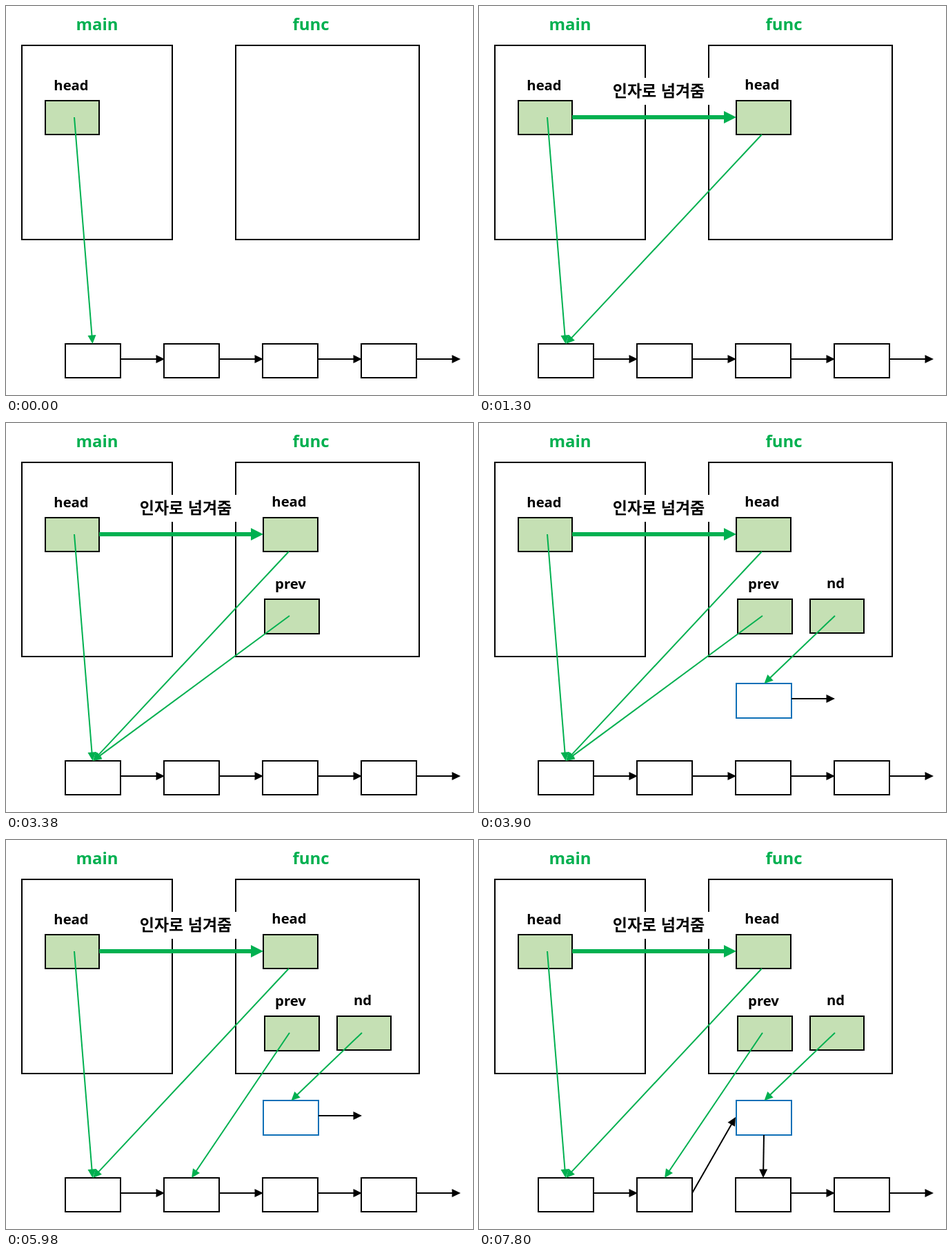
Recreate the animation shown at these times as an HTML page. Size 677 px wide and 563 px high, loop 8 s.

```html
<!DOCTYPE html>
<html lang="ko">
<head>
<meta charset="utf-8">
<style>
  html, body { margin: 0; width: 100%; height: 100%; overflow: hidden; background: #fff; }
  svg { display: block; width: 677px; height: 563px; }
  text { font: 700 20.3px "Open Sans", "Noto Sans", sans-serif; text-anchor: middle; }
  .title { font-size: 24px; fill: #00b050; }
  .ko { font: 700 23px "Noto Sans CJK KR", "Noto Sans CJK", sans-serif; }
</style>
</head>
<body>
<svg id="stage" viewBox="0 0 677 563"></svg>
<script>
const LOOP = 8000, STEP = 1300, LAST = 6;
const GREEN = '#00b050', PALE = '#c5e0b4', BLUE = '#0f70b7', BLACK = '#000';
const stage = document.getElementById('stage');
const parts = [];

// Each part is visible from step `from` through step `to`.
function add(tag, attrs, from = 0, to = LAST) {
  const el = document.createElementNS('http://www.w3.org/2000/svg', tag);
  for (const key in attrs) el.setAttribute(key, attrs[key]);
  stage.append(el);
  parts.push({ el, from, to });
  return el;
}

function box(x1, y1, x2, y2, from, fill = '#fff', stroke = BLACK) {
  add('rect', { x: x1, y: y1, width: x2 - x1, height: y2 - y1, fill, stroke, 'stroke-width': 2 }, from);
}

function label(x, y, str, from, cls = '') {
  add('text', { x, y, class: cls }, from).textContent = str;
}

function arrow(x1, y1, x2, y2, color, from, to, width = 2, head = 12.5) {
  const len = Math.hypot(x2 - x1, y2 - y1);
  const ux = (x2 - x1) / len, uy = (y2 - y1) / len;
  const bx = x2 - ux * head, by = y2 - uy * head;
  const half = width > 2 ? head / 2 : 6;
  add('line', { x1, y1, x2: bx + ux, y2: by + uy, stroke: color, 'stroke-width': width }, from, to);
  add('polygon', {
    points: [[x2, y2], [bx - uy * half, by + ux * half], [bx + uy * half, by - ux * half]].join(' '),
    fill: color
  }, from, to);
}

// Stack frames
box(23, 57, 241, 338);
box(333, 57, 599, 338);
label(132, 35, 'main', 0, 'title');
label(442, 35, 'func', 0, 'title');

// Linked list
for (let i = 0; i < 4; i++) {
  const x = 86 + 143 * i;
  box(x, 489, x + 80, 538);
  arrow(x + 80, 511, x + 144, 511, BLACK, 0, i === 1 ? 5 : LAST);
}

// Caller's pointer
label(94.5, 122, 'head', 0);
box(57, 137, 135, 186, 0, PALE);
arrow(99, 161, 125.5, 489, GREEN, 0);

// Passing the argument
add('rect', { x: 184, y: 104, width: 153, height: 39, fill: '#fff' }, 1);
label(260.5, 131, '인자로 넘겨줌', 1, 'ko');
label(410.5, 121, 'head', 1);
box(373, 137, 452, 186, 1, PALE);
arrow(135, 161, 373, 161, GREEN, 1, LAST, 6, 18);
arrow(410, 186, 126, 489, GREEN, 1);

// Walking pointer
label(412.5, 240, 'prev', 2);
box(375, 255, 454, 305, 2, PALE);
arrow(411, 279, 126, 489, GREEN, 2, 3);
arrow(411, 279, 269, 489, GREEN, 4);

// New node
label(517, 239, 'nd', 3);
box(480, 255, 558, 304, 3, PALE);
box(373, 377, 453, 427, 3, '#fff', BLUE);
arrow(516, 279, 413.5, 377, GREEN, 3);
arrow(453, 399, 516, 399, BLACK, 3, 4);
arrow(413, 427, 412, 489, BLACK, 5);
arrow(309, 511, 372, 401, BLACK, 6);

const start = performance.now();
let shown = -1;
function draw() {
  const step = Math.floor(((performance.now() - start) % LOOP) / STEP);
  if (step !== shown) {
    shown = step;
    for (const p of parts) p.el.style.display = step >= p.from && step <= p.to ? '' : 'none';
  }
  requestAnimationFrame(draw);
}
draw();
</script>
</body>
</html>
```
